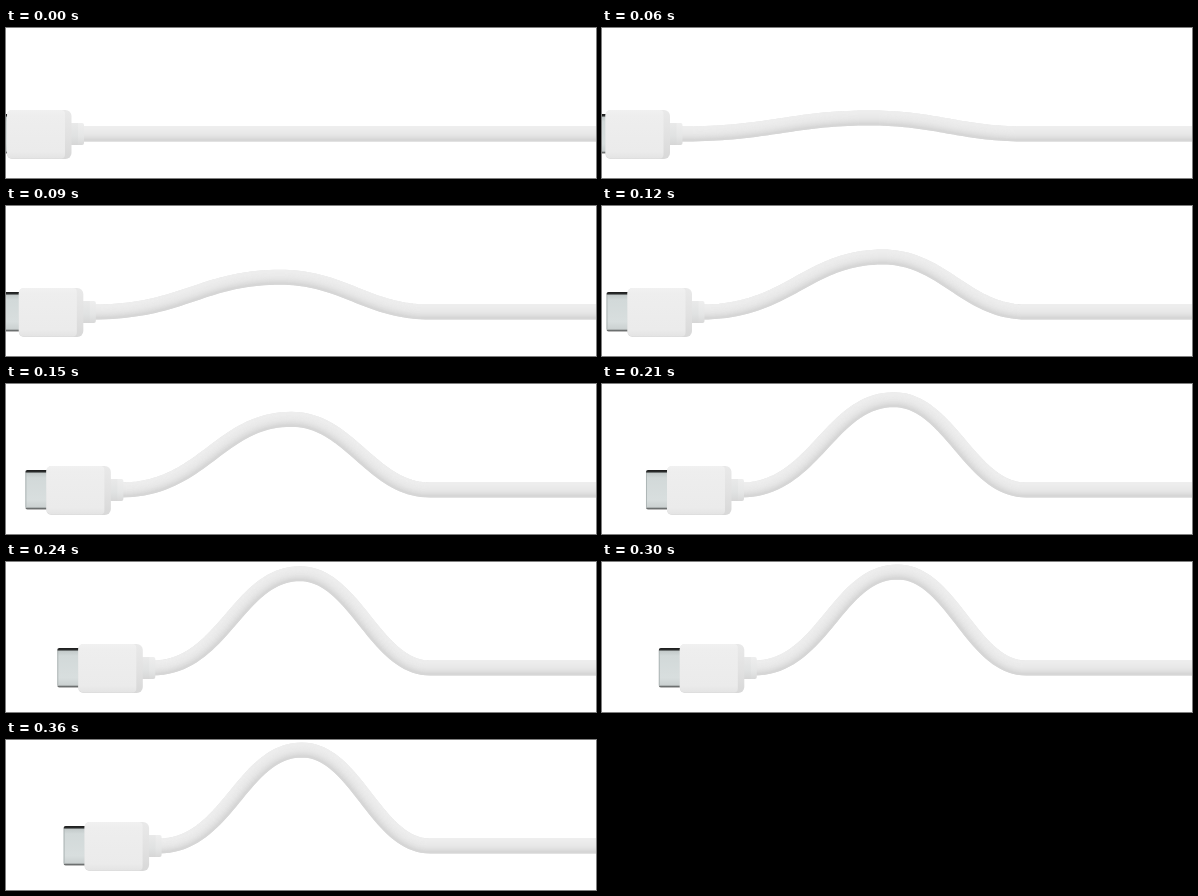
An HTML page with a canvas that plays this animation: 590 by 150 pixels, repeating every 390 ms.

```html
<!DOCTYPE html>
<html lang="en">
<head>
<meta charset="utf-8">
<title>Cable</title>
<style>
html, body { margin: 0; width: 100%; height: 100%; overflow: hidden; background: #fff; }
canvas { display: block; }
</style>
</head>
<body>
<canvas id="stage" width="590" height="150"></canvas>
<script>
const ctx = document.getElementById('stage').getContext('2d');
const LOOP = 390, STEP = 30;
const AXIS = 106, BEND_END = 424, HALF = 7.5;

// Poses every 60 ms: plug travel, height of the bend, x of its crest
const travel = [0, 2.5, 24.5, 53.7, 71.3, 76.8, 77.6];
const rise = [0, 16, 55, 83, 94.3, 96, 96];
const crest = [262, 268, 281, 289, 294, 295.5, 296];

function sample(keys, u) {
  const i = Math.min(Math.floor(u), keys.length - 2);
  const f = u - i;
  const at = n => keys[Math.max(0, Math.min(keys.length - 1, n))];
  const [a, b, c, d] = [at(i - 1), at(i), at(i + 1), at(i + 2)];
  return b + f / 2 * (c - a + f * (2 * a - 5 * b + 4 * c - d + f * (3 * (b - c) + d - a)));
}

function gradient(x0, y0, x1, y1, ...stops) {
  const g = ctx.createLinearGradient(x0, y0, x1, y1);
  stops.forEach(([pos, color]) => g.addColorStop(pos, color));
  return g;
}

function box(x, y, w, h, radii, fill) {
  ctx.beginPath();
  ctx.roundRect(x, y, w, h, radii);
  ctx.fillStyle = fill;
  ctx.fill();
}

// Points with normals on an S-shaped cubic that is level at both ends
function bend(x0, y0, x1, y1, lead, trail) {
  const w = x1 - x0, h = y1 - y0, count = 40;
  return Array.from({ length: count + 1 }, (_, i) => {
    const t = i / count, s = 1 - t;
    const x = x0 + w * (3 * s * s * t * lead + 3 * s * t * t * (1 - trail) + t ** 3);
    const y = y0 + h * (3 - 2 * t) * t * t;
    const dx = w * (s * s * lead + 2 * s * t * (1 - trail - lead) + t * t * trail);
    const dy = h * 2 * s * t;
    const len = Math.hypot(dx, dy);
    return { x, y, nx: -dy / len, ny: dx / len };
  });
}

function strokeOffset(points, offset, width, color) {
  ctx.beginPath();
  points.forEach(p => ctx.lineTo(p.x + p.nx * offset, p.y + p.ny * offset));
  ctx.lineWidth = width;
  ctx.strokeStyle = color;
  ctx.stroke();
}

function drawCable(x, height, peak) {
  const top = AXIS - height;
  const points = [
    ...bend(x, AXIS, peak, top, 0.48, 0.42),
    ...bend(peak, top, BEND_END, AXIS, 0.42, 0.42),
    { x: 590, y: AXIS, nx: 0, ny: 1 }
  ];
  // Shade across the cable: light upper side, darker underside
  strokeOffset(points, 0, HALF * 2, '#e2e2e2');
  for (let d = -HALF + 1; d <= HALF - 1; d += 0.5) {
    const v = (d + HALF) / (HALF * 2);
    const tone = Math.round(238 - 5 * v - 24 * v ** 3);
    strokeOffset(points, d, 2, `rgb(${tone}, ${tone}, ${tone})`);
  }
}

function drawPlug(x) {
  // Metal tip
  box(x - 20, 86, 24, 39.5, [2, 0, 0, 2], gradient(0, 86, 0, 125.5,
    [0, '#1c1c1c'], [0.05, '#2c2e2e'], [0.08, '#c3caca'], [0.2, '#d2d9d9'],
    [0.75, '#d8dede'], [0.94, '#cbd1d1'], [0.97, '#6a6e6e'], [1, '#777']));
  box(x - 20, 89, 1, 34, 0, '#aeb6b6');

  // Strain relief
  box(x + 63, 95, 15, 22, [0, 2, 2, 0], gradient(0, 95, 0, 117,
    [0, '#eeeeee'], [0.6, '#e5e6e6'], [1, '#d8d8d8']));
  box(x + 63, 95, 9, 22, 0, gradient(0, 95, 0, 117,
    [0, '#e9e9e9'], [0.6, '#e0e2e2'], [1, '#d6d6d6']));

  // Housing with its rounded back edge
  box(x + 1, 82, 64.5, 49, [5, 6, 6, 5], gradient(0, 82, 0, 131,
    [0, '#e9e9e9'], [0.5, '#e2e2e2'], [1, '#d8d8d8']));
  box(x + 1, 82, 58, 48.5, [5, 4, 4, 5], gradient(0, 82, 0, 131,
    [0, '#f1f1f1'], [0.1, '#eeeeee'], [0.85, '#ebebeb'], [1, '#e3e3e3']));
}

function draw(now) {
  const u = Math.floor((now % LOOP) / STEP) / 2;
  const x = Math.max(0, sample(travel, u));
  ctx.clearRect(0, 0, 590, 150);
  drawCable(x + 75, sample(rise, u), sample(crest, u));
  drawPlug(x);
}

const start = performance.now();
function tick() {
  draw(performance.now() - start);
  requestAnimationFrame(tick);
}
tick();
</script>
</body>
</html>
```
